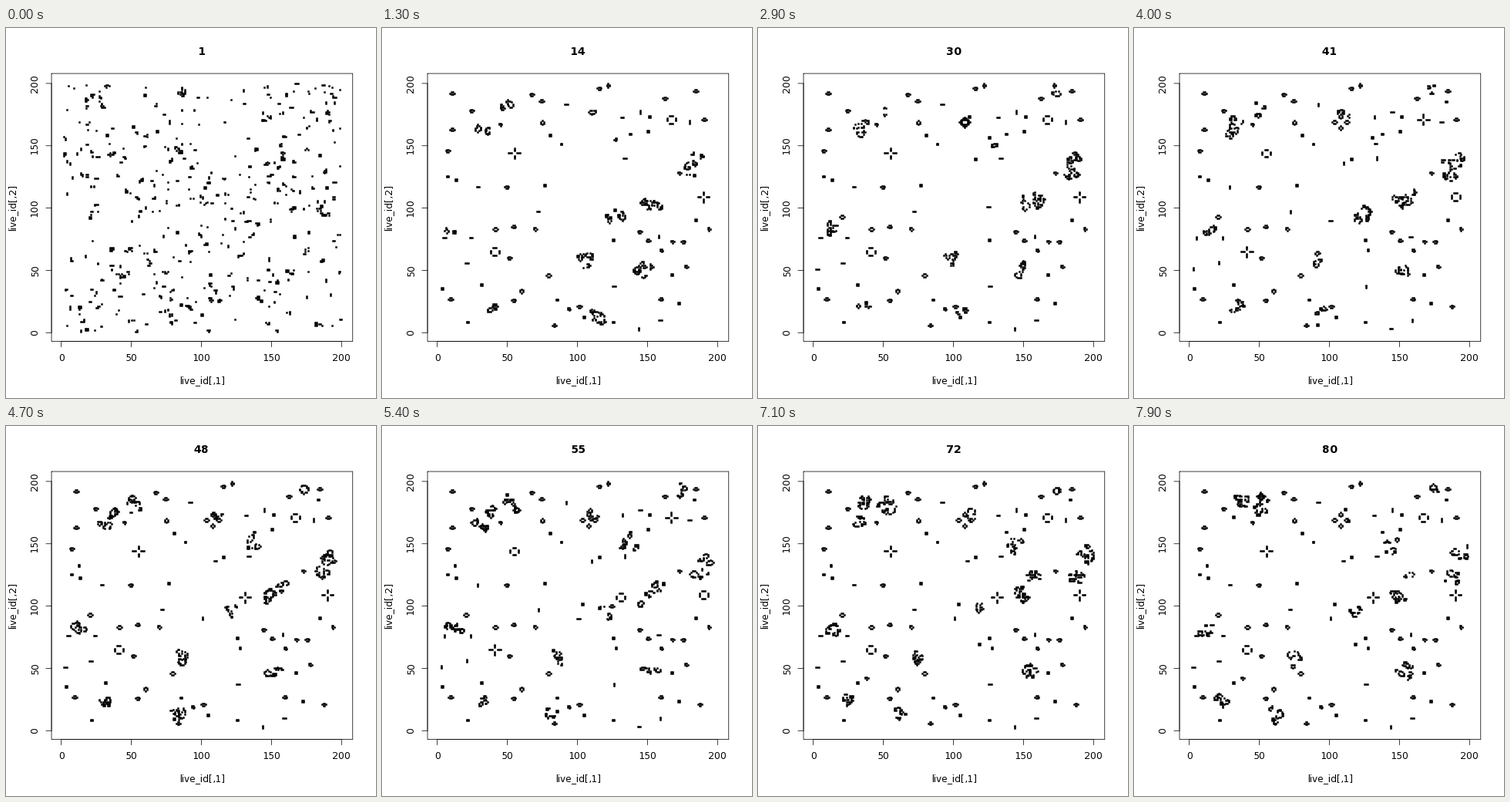
A matplotlib script for the animation above (8000 ms loop, 480x480 px).

```python
import numpy as np
import matplotlib
import matplotlib.pyplot as plt
from matplotlib.animation import FuncAnimation

matplotlib.rcParams.update({"toolbar": "None", "font.family": "DejaVu Sans",
                            "text.hinting_factor": 1})

SIZE = 480
LEFT, RIGHT, TOP, BOTTOM = 59.04, 449.76, 59.04, 406.56
LO, HI = -6.96, 207.96
SX, SY = (RIGHT - LEFT) / (HI - LO), (BOTTOM - TOP) / (HI - LO)
N, STEPS = 208, 80
OPENING_END = 11
rng = np.random.default_rng(7)


def to_px(x, y):
    return LEFT + (x - LO) * SX, BOTTOM - (y - LO) * SY


PX, PY = to_px(*np.ogrid[:N, :N])

SHAPES = {
    "block": ("OO", "OO"),
    "hive": (".OO.", "O..O", ".OO."),
    "tall": (".O.", "O.O", "O.O", ".O."),
    "boat": ("OO.", "O.O", ".O."),
    "row": ("OOO",),
    "col": ("O", "O", "O"),
    "seven": ("OOOOOOO",),
}
ODDS = {"block": 0.45, "hive": 0.12, "boat": 0.18, "row": 0.13, "col": 0.12}

# Key points in stage pixels
HIVES = [(90, 132), (85, 160), (117, 108), (194, 86), (282, 79), (368, 91),
         (407, 81), (418, 119), (161, 206), (171, 258), (147, 261),
         (166, 299), (216, 321), (223, 385), (256, 362), (335, 264),
         (345, 276)]
TALLS = [(208, 123), (293, 74), (181, 341)]
CROSSES = [(171, 162), (417, 219)]
RINGS = [(146, 290), (375, 118)]
LATE_CROSS = (310, 222)
HONEY_FARM = (268, 122)

# Restless regions: x, y, radius at the start and at the end
REGIONS = [
    (125, 135, 7, 130, 122, 10), (135, 132, 5, 137, 99, 9),
    (161, 101, 7, 168, 104, 13), (269, 108, 6, 276, 115, 8),
    (299, 147, 6, 334, 155, 11), (346, 228, 9, 342, 218, 10),
    (363, 229, 8, 357, 196, 8), (302, 245, 10, 289, 235, 8),
    (386, 79, 7, 388, 84, 5), (407, 175, 11, 426, 166, 11),
    (402, 186, 8, 413, 196, 10), (340, 316, 10, 352, 319, 10),
    (262, 298, 9, 206, 300, 9), (143, 364, 7, 118, 354, 8),
    (281, 374, 9, 184, 373, 9), (90, 259, 8, 97, 263, 10)]
STAGES = range(7, STEPS, 13)


def empty():
    return np.zeros((N, N), bool)


def step(g):
    n = sum(np.roll(g.astype(int), (i, j), (0, 1))
            for i in (-1, 0, 1) for j in (-1, 0, 1)) - g
    return (n == 3) | (g & (n == 2))


def stamp(g, name, px, py):
    rows = SHAPES[name]
    x0 = round((px - LEFT) / SX + LO - (len(rows[0]) - 1) / 2)
    y0 = round((BOTTOM - py) / SY + LO + (len(rows) - 1) / 2)
    for j, row in enumerate(rows):
        for i, c in enumerate(row):
            if c == "O":
                g[(x0 + i) % N, (y0 - j) % N] = True


def lights(px, py, cross):
    """Four blinkers around a centre, as (shape, x, y)."""
    side, end = ("row", "col") if cross else ("col", "row")
    return [(side, px - 3 * SX, py), (side, px + 3 * SX, py),
            (end, px, py - 3 * SY), (end, px, py + 3 * SY)]


def scatter(count, taken):
    """Random small objects that keep clear of (x, y, gap) in taken."""
    out = []
    while len(out) < count:
        x, y = rng.uniform(76, 432), rng.uniform(74, 391)
        if all(np.hypot(x - a, y - b) > gap for a, b, gap in taken):
            out.append((str(rng.choice(list(ODDS), p=list(ODDS.values()))), x, y))
            taken.append((x, y, 13))
    return out


def schedule():
    """Settled objects as (generation, shape, x, y); blinkers start even."""
    groups = [[("hive", *p)] for p in HIVES] + [[("tall", *p)] for p in TALLS]
    groups += [lights(*p, True) for p in CROSSES]
    groups += [lights(*p, False) for p in RINGS]
    plan = [(int(start), *item) for group in groups
            for start in [rng.choice([4, 6, 8])] for item in group]
    plan += [(48, *item) for item in lights(*LATE_CROSS, True)]
    plan.append((25, "seven", *HONEY_FARM))

    taken = [(x, y, 14) for x, y in HIVES + TALLS]
    taken += [(x, y, 24) for x, y in CROSSES + RINGS + [LATE_CROSS, HONEY_FARM]]
    taken += [p for a, b, r, c, d, q in REGIONS
              for p in ((a, b, r + 8), (c, d, q + 8))]
    for k, item in enumerate(scatter(58, taken)):
        start = rng.integers(10, 30) * 2 if k % 5 == 0 else rng.choice([4, 6, 8])
        plan.append((int(start), *item))
    return plan


def soup(u):
    """Random cells in every region at progress u, and where they may live."""
    g, mask = empty(), empty()
    for region in np.array(REGIONS):
        x, y, r = region[:3] + (region[3:] - region[:3]) * u
        d = np.hypot(PX - x, PY - y)
        g |= (d < r) & (rng.random((N, N)) < 0.42)
        mask |= d < r + 6
    return step(step(g)) & mask, mask


def history():
    plan = schedule()
    opening, calm, wild, mask = empty(), empty(), empty(), empty()
    opening[1:201, 1:201] = rng.random((200, 200)) < 0.08
    out = []
    for t in range(1, STEPS + 1):
        calm = step(calm)
        wild = step(wild) & mask
        opening = step(opening) if t <= OPENING_END else empty()
        if t in STAGES:
            wild, mask = soup(np.clip((t - 7) / 65, 0, 1))
        for start, *item in plan:
            if start == t:
                stamp(calm, *item)
        cells = calm | wild | opening
        x, y = np.nonzero(cells[:201, :201])
        out.append(np.column_stack(to_px(x, y)))
    return out


generations = history()

fig = plt.figure(figsize=(SIZE / 72, SIZE / 72), dpi=72, facecolor="white")
ax = fig.add_axes([0, 0, 1, 1])
ax.set(xlim=(0, SIZE), ylim=(SIZE, 0))
ax.axis("off")


def line(xs, ys):
    ax.plot(xs, ys, color="black", lw=0.75, snap=False,
            solid_capstyle="round")


def label(x, y, s, size=12, **kw):
    return ax.text(x, y, s, fontsize=size, ha="center", va="baseline",
                   rotation_mode="anchor", **kw)


line([LEFT, RIGHT, RIGHT, LEFT, LEFT], [TOP, TOP, BOTTOM, BOTTOM, TOP])
(x0, y0), (x1, y1) = to_px(0, 0), to_px(200, 200)
line([x0, x1], [BOTTOM, BOTTOM])
line([LEFT, LEFT], [y0, y1])
for v in range(0, 201, 50):
    x, y = to_px(v, v)
    line([x, x], [BOTTOM, BOTTOM + 7.2])
    line([LEFT, LEFT - 7.2], [y, y])
    label(x, 432.2, str(v))
    label(41.4, y, str(v), rotation=90)
label(254.4, 461.2, "live_id[,1]")
label(11.8, 232.8, "live_id[,2]", rotation=90)
title = label(254.0, 34.8, "1", 14.4, weight="bold")
dots = ax.scatter([], [], s=2.5 ** 2, marker="s", color="black",
                  linewidths=0, antialiased=False, snap=False)


def draw(i):
    dots.set_offsets(generations[i])
    title.set_text(str(i + 1))
    return dots, title


anim = FuncAnimation(fig, draw, frames=STEPS, interval=100,
                     repeat=True, repeat_delay=0, blit=False)
plt.show()
```
